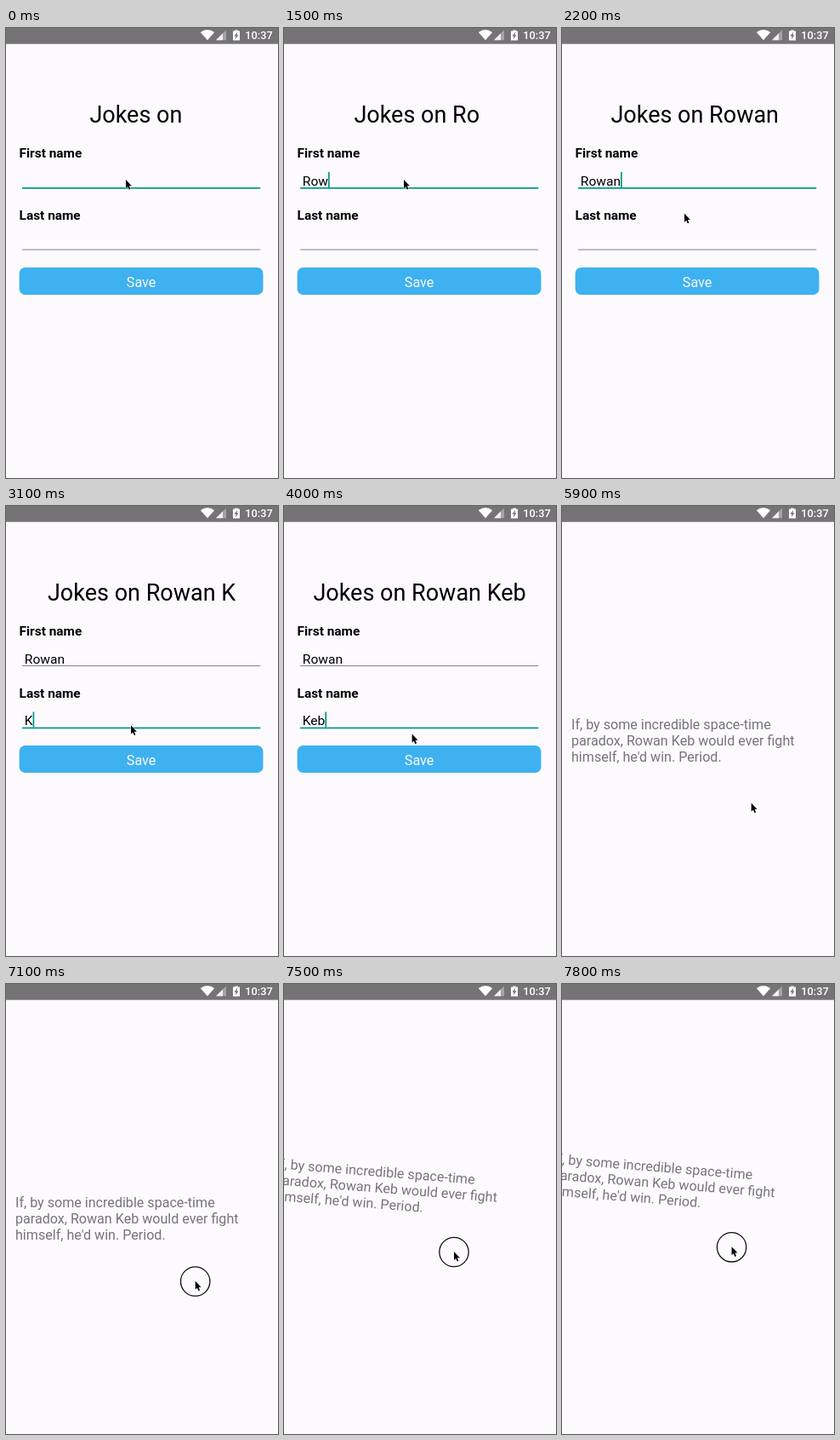
Write an HTML page that moves like this. It is 320x528 px and loops after 8 s.

```html
<!DOCTYPE html>
<html lang="en">
<head>
<meta charset="utf-8">
<title>Jokes on</title>
<style>
  html, body { margin: 0; width: 100%; height: 100%; overflow: hidden; background: #fcfafd; }
  svg { display: block; width: 320px; height: 528px; font-family: Roboto, sans-serif; }
  text { white-space: pre; }
  .label { font-size: 15.4px; font-weight: 700; }
  .value { font-size: 15.56px; }
  .caret { fill: #009688; }
  #title { font-size: 27px; text-anchor: middle; }
  #joke { font-size: 16.1px; fill: #757477; }
</style>
</head>
<body>
<svg viewBox="0 0 320 528">
  <rect width="320" height="528" fill="#fcfafd"/>

  <g id="form">
    <text id="title" x="159.6" y="110.8"></text>
    <g class="field">
      <text class="label" x="15.6" y="152">First name</text>
      <text class="value" x="21.8" y="184.7"></text>
      <rect class="line" x="19" y="187" width="280.3"/>
      <rect class="caret" y="169" width="1.7" height="18"/>
    </g>
    <g class="field" transform="translate(0 72.6)">
      <text class="label" x="15.6" y="152">Last name</text>
      <text class="value" x="21.8" y="184.7"></text>
      <rect class="line" x="19" y="187" width="280.3"/>
      <rect class="caret" y="169" width="1.7" height="18"/>
    </g>
    <rect x="15.6" y="281" width="286.9" height="32" rx="7" fill="#3eb1f0"/>
    <text x="159.1" y="303.8" font-size="16.2" text-anchor="middle" fill="#fcfafd">Save</text>
  </g>

  <g id="joke">
    <text x="11" y="262">If, by some incredible space-time</text>
    <text x="11" y="280.8">paradox, Rowan Keb would ever fight</text>
    <text x="11" y="299.6">himself, he'd win. Period.</text>
  </g>

  <g fill="#fff">
    <rect width="320" height="18.7" fill="#757376"/>
    <path d="M237 14.2 228.8 5Q237-.8 245.2 5Z"/>
    <path d="M247 14.2H259V2.4Z" opacity=".35"/>
    <path d="M247 14.2H255V6.3Z" opacity=".85"/>
    <path d="M267 3.6H269.3V2.4H272.7V3.6H275V14.4H267Z"/>
    <path d="M272.3 4.6 268.4 9.6H270.5L269.8 13.2 273.6 8.2H271.5Z" fill="#757376"/>
    <text x="281.2" y="13.1" font-size="12.8" font-weight="500">10:37</text>
  </g>

  <g id="pointer">
    <circle id="ring" cy=".5" r="17.2" fill="none" stroke="#111" stroke-width="1.3"/>
    <path d="M0 0V10L2.2 7.9 3.8 11.6 5.4 10.9 3.9 7.2H6.9Z" stroke="#fff" stroke-width=".9" paint-order="stroke"/>
  </g>
</svg>
<script>
const LOOP = 8000, STEP = 100, TITLE_LAG = 100, BLINK = 550;
const FOCUS_LAST = 2800, SHOW_JOKE = 4800, PRESS = 7100;
const TILT_PER_PIXEL = 0.2;
const $ = selector => document.querySelector(selector);

const fields = [
  { text: "Rowan", keys: [100, 500, 1500, 1600, 1700], focus: [0, FOCUS_LAST], wakes: [] },
  { text: "Keb", keys: [3000, 3400, 3500], focus: [FOCUS_LAST, SHOW_JOKE], wakes: [FOCUS_LAST] }
];
document.querySelectorAll(".field").forEach((node, i) => {
  for (const part of ["value", "line", "caret"]) fields[i][part + "Node"] = node.querySelector("." + part);
});

const home = { x: 141, y: 178 };
const moves = [
  { from: 1900, to: 2500, x: 147, y: 257.5 },
  { from: 3850, to: 4300, x: 161, y: 296.5 },
  { from: 5300, to: 5900, x: 222.7, y: 348.5 },
  { from: 7200, to: 7500, x: 200, y: 314 },
  { from: 7500, to: 7800, x: 199.6, y: 308.3 }
];

const clamp = v => Math.min(1, Math.max(0, v));
const smooth = k => k * k * (3 - 2 * k);
const show = (node, on) => node.setAttribute("visibility", on ? "inherit" : "hidden");
const typed = (field, t) => field.text.slice(0, field.keys.filter(key => key <= t).length);

function pointerAt(t) {
  return moves.reduce((p, move) => {
    const k = smooth(clamp((t - move.from) / (move.to - move.from)));
    return { x: p.x + (move.x - p.x) * k, y: p.y + (move.y - p.y) * k };
  }, home);
}

// The caret restarts its blink at every key press and on a tap into the field
function caretOn(field, t) {
  const last = Math.max(...[...field.wakes, ...field.keys].filter(time => time <= t));
  return Number.isFinite(last) && (t - last) % (2 * BLINK) < BLINK;
}

function drawField(field, t) {
  const focused = t >= field.focus[0] && t < field.focus[1];
  field.valueNode.textContent = typed(field, t);
  field.lineNode.setAttribute("height", focused ? 1.7 : 0.9);
  field.lineNode.setAttribute("fill", focused ? "#009688" : "#77757a");
  field.caretNode.setAttribute("x", 21.8 + field.valueNode.getComputedTextLength());
  show(field.caretNode, focused && caretOn(field, t));
}

function render(t) {
  const joking = t >= SHOW_JOKE;
  show($("#form"), !joking);
  show($("#joke"), joking);
  show($("#ring"), t >= PRESS);

  // Both name slots keep their separating space, so the heading stays centred with it
  const [first, last] = fields.map(field => typed(field, t - TITLE_LAG));
  $("#title").textContent = `Jokes on ${first} ${last}`.replace(/ /g, "\u00a0");
  fields.forEach(field => drawField(field, t));

  const pointer = pointerAt(t);
  $("#pointer").setAttribute("transform", `translate(${pointer.x} ${pointer.y})`);

  // The pressed card follows the pointer and tilts with the sideways drag
  const grip = pointerAt(Math.min(t, PRESS));
  const dx = pointer.x - grip.x, dy = pointer.y - grip.y;
  $("#joke").setAttribute("transform",
    `translate(${dx} ${dy}) rotate(${-dx * TILT_PER_PIXEL} 154 281)`);
}

const start = performance.now();
function tick() {
  const t = (performance.now() - start) % LOOP;
  render(Math.floor(t / STEP) * STEP);
  requestAnimationFrame(tick);
}
tick();
</script>
</body>
</html>
```
